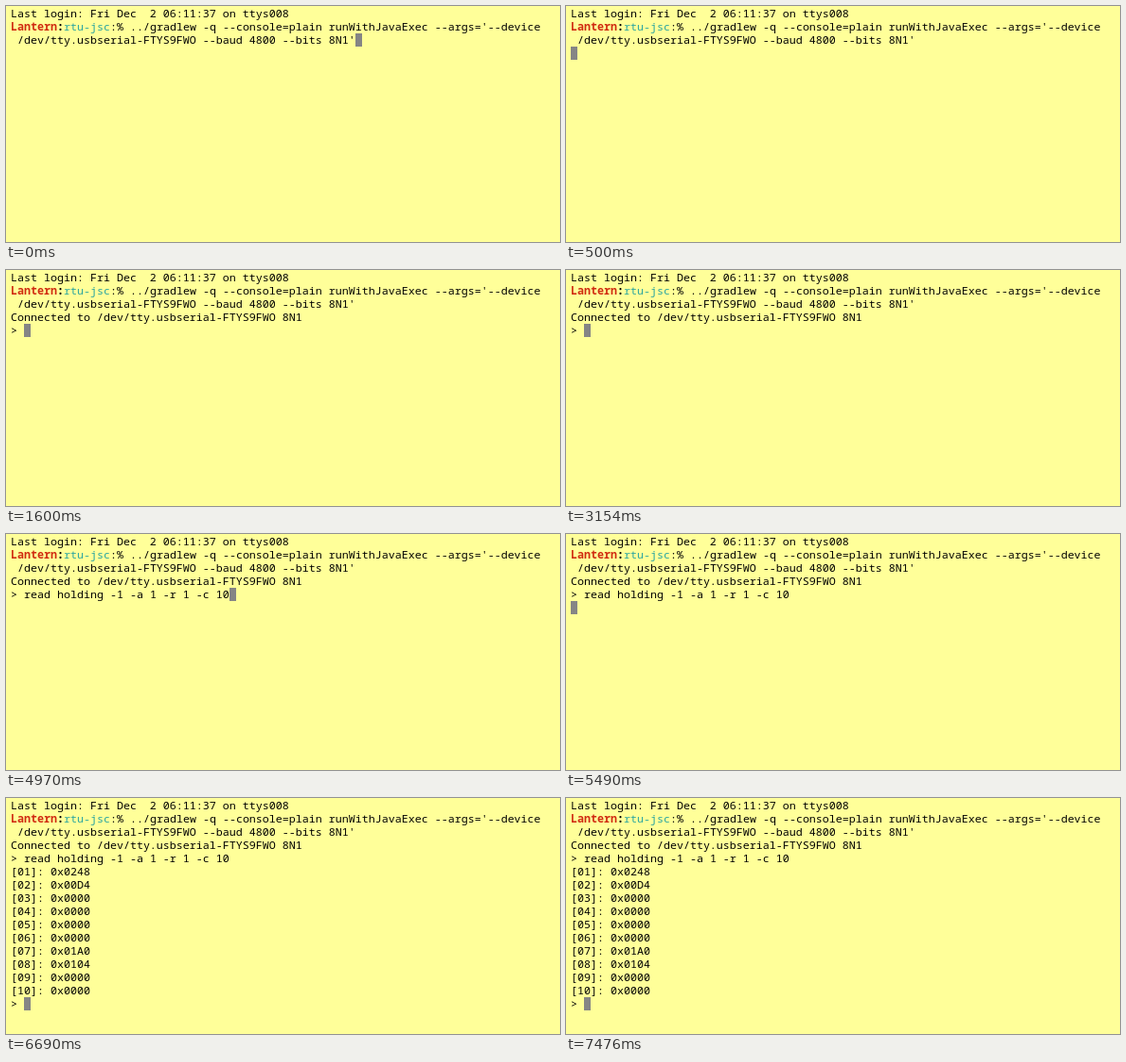
Animation of 585x250 px, one loop 8000 ms. Source, as an HTML page:

```html
<!DOCTYPE html>
<html lang="en">
<head>
<meta charset="utf-8">
<title>Terminal session</title>
<style>
  html, body { margin: 0; width: 100%; height: 100%; overflow: hidden; background: #ffff99; }
  svg { display: block; }
  text { font: 11.667px "Noto Sans Mono", "DejaVu Sans Mono", monospace; fill: #000; white-space: pre; }
  .host { fill: #d02a10; font-weight: bold; }
  .bold { font-weight: bold; }
  .dir { fill: #2aa5a0; }
</style>
</head>
<body>
<svg id="stage" width="585" height="250" viewBox="0 0 585 250">
  <rect width="585" height="250" fill="#ffff99"/>
</svg>
<script>
const LOOP = 8000, LEFT = 5, TOP = 1, COL = 7, ROW = 14, ASCENT = 11;
const stage = document.getElementById('stage');

function add(tag, attrs, content = '') {
  const node = document.createElementNS('http://www.w3.org/2000/svg', tag);
  for (const key in attrs) node.setAttribute(key, attrs[key]);
  node.textContent = content;
  return stage.appendChild(node);
}

// Each printed piece appears at its start time and stays until the loop ends.
const pieces = [];
function print(start, row, col, content, style = '') {
  const node = add('text', { x: LEFT + col * COL, y: TOP + ASCENT + row * ROW, class: style }, content);
  pieces.push({ start, node });
}

print(0, 0, 0, 'Last login: Fri Dec  2 06:11:37 on ttys008');
print(0, 1, 0, 'Lantern', 'host');
print(0, 1, 7, ':', 'bold');
print(0, 1, 8, 'rtu-jsc', 'dir');
print(0, 1, 15, ":% ../gradlew -q --console=plain runWithJavaExec --args='--device");
print(0, 2, 1, "/dev/tty.usbserial-FTYS9FWO --baud 4800 --bits 8N1'");
print(1600, 3, 0, 'Connected to /dev/tty.usbserial-FTYS9FWO 8N1');
print(1600, 4, 0, '>');
print(4190, 4, 2, 'read holding -1 -a 1 -r 1 -c 10');

const registers = ['0248', '00D4', '0000', '0000', '0000', '0000', '01A0', '0104', '0000', '0000'];
registers.forEach((value, i) => {
  print(6690, 5 + i, 0, `[${String(i + 1).padStart(2, '0')}]: 0x${value}`);
});
print(6690, 15, 0, '>');

const cursor = add('rect', { width: COL, height: ROW, fill: '#858585' });
const stops = [
  { start: 0, row: 2, col: 52 },
  { start: 500, row: 3, col: 0 },
  { start: 1600, row: 4, col: 2 },
  { start: 4190, row: 4, col: 33 },
  { start: 5490, row: 5, col: 0 },
  { start: 6690, row: 15, col: 2 }
];

function draw(time) {
  for (const { start, node } of pieces) {
    node.setAttribute('visibility', time >= start ? 'visible' : 'hidden');
  }
  const { row, col } = stops.filter(stop => time >= stop.start).pop();
  cursor.setAttribute('x', LEFT + col * COL);
  cursor.setAttribute('y', TOP + row * ROW);
}

const begin = performance.now();
function tick() {
  draw((performance.now() - begin) % LOOP);
  requestAnimationFrame(tick);
}
tick();
</script>
</body>
</html>
```
